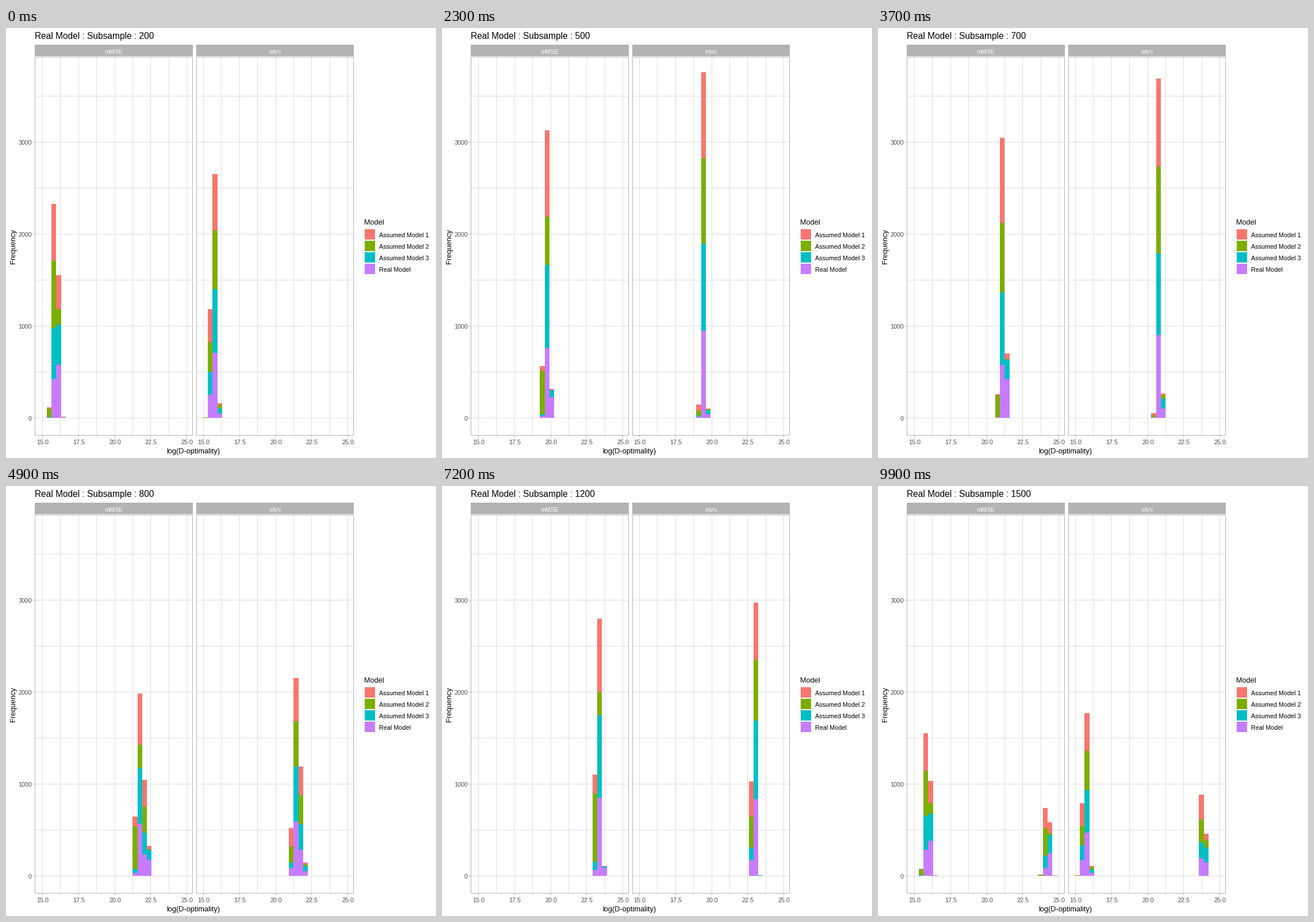
Recreate the animation shown at these times as a matplotlib script. Size 748 by 748 pixels, loop 10000 ms.

```python
import math

import numpy as np
import matplotlib.pyplot as plt
from matplotlib.animation import FuncAnimation
from matplotlib.patches import Rectangle

SIZE, DPI = 748, 68
BINS, BIN_W, BIN_X = 30, 8.3, 63.05
BASE, Y_SCALE = 678, 0.16
GREY, GRID, DIM = "#b3b3b3", "#dedede", "#4d4d4d"
MODELS = ["Assumed Model 1", "Assumed Model 2", "Assumed Model 3", "Real Model"]
COLORS = ["#f8766d", "#7cae00", "#00bfc4", "#c77cff"]
SIZES = range(200, 1501, 100)

PANELS = {"mMSE": 0, "mVc": 280.05}
# Quadratic path of the real model's centre, in bins, over log(size / 200).
TREND = {"mMSE": (-0.2256, 12.94, 3.073), "mVc": (-0.0444, 12.337, 2.284)}
# Per model: offset from that path and spread, each from small to large samples.
SHAPE = {
    "mMSE": [(-.206, -.324, .384, .26), (-.496, -.722, .447, .29),
             (-.127, -.156, .357, .285), (0, 0, .36, .345)],
    "mVc": [(-.149, -.172, .408, .25), (-.075, -.139, .446, .255),
            (.01, .024, .442, .25), (0, 0, .422, .255)],
}


def counts(panel, shape, size):
    """Expected counts per bin of 1000 normally distributed values."""
    x = math.log(size / 200)
    ramp = min(1, x / math.log(2.5))
    off0, off1, sd0, sd1 = shape
    mu = np.polyval(TREND[panel], x) + off0 + (off1 - off0) * ramp
    sd = sd0 + (sd1 - sd0) * ramp
    cdf = [0.5 * (1 + math.erf((k - mu) / sd / math.sqrt(2)))
           for k in range(BINS + 1)]
    return np.round(1000 * np.diff(cdf))


# Axes of each array: model, subsample size, bin.
DATA = {p: np.array([[counts(p, s, n) for n in SIZES] for s in SHAPE[p]])
        for p in PANELS}


def timeline():
    """(state, progress to next state, titled state) for every frame."""
    steps, n = [], len(SIZES)
    for i in range(n):
        steps += [(i, 0, i)] * 4
        length = 4 if i < 3 else 3
        for s in range(1, length + 1):
            near = i if s <= math.ceil(length / 2) else (i + 1) % n
            steps.append((i, s / length, near))
    return steps[:-1]


FRAMES = timeline()

plt.rcParams["font.family"] = "Liberation Sans"
fig = plt.figure(figsize=(SIZE / DPI, SIZE / DPI), dpi=DPI, facecolor="white")
ax = fig.add_axes([0, 0, 1, 1])
ax.set_xlim(0, SIZE)
ax.set_ylim(SIZE, 0)
ax.axis("off")


def box(x, y, w, h, color, z=1):
    return ax.add_patch(Rectangle((x, y), w, h, fc=color, lw=0, zorder=z,
                                  antialiased=False))


def text(x, y, s, px, color="black", ha="left", va="baseline", **kw):
    return ax.text(x, y, s, fontsize=px * 72 / DPI, color=color, ha=ha,
                   va=va, zorder=6, **kw)


def draw_panel(name, dx):
    left, right = math.floor(50.97 + dx), math.floor(324.6 + dx)
    width = right - left + 1
    for i in range(8):
        box(left, BASE - 80 * i, width, 1, GRID)
    for i in range(9):
        x = math.floor(63.5 + dx + 31.375 * i)
        box(x, 50, 1, 659, GRID)
        if i % 2 == 0:
            box(x, 709, 1, 3, GREY)
            text(x + 0.5, 724, f"{15 + 1.25 * i:.1f}", 10.7, DIM, "center")
    for x in (left, right):
        box(x, 50, 1, 659, GREY, 4)
    for y in (50, 708):
        box(left, y, width, 1, GREY, 4)
    box(left, 29, width, 20, GREY)
    text((left + right + 1) / 2, 45, name, 10.6, "white", "center")


def draw_legend():
    text(623, 342, "Model", 12.7)
    for i, (name, color) in enumerate(zip(MODELS, COLORS)):
        y = round(350 + 19.85 * i)
        box(624, y, 18, 18, color)
        text(649, y + 14, name, 10.75)


def draw_labels():
    for i in range(4):
        y = BASE - 160 * i
        box(47, y, 3, 1, GREY)
        text(45, y + 5, str(1000 * i), 10.7, DIM, "right")
    text(326, 740, "log(D-optimality)", 12.7, ha="center")
    text(13.5, 379.5, "Frequency", 12.7, ha="center", va="center", rotation=90)


def make_bars(dx):
    edges = np.floor(BIN_X + dx + BIN_W * np.arange(BINS + 1))
    return [[box(a, BASE, b - a, 0, c, 3) for a, b in zip(edges, edges[1:])]
            for c in COLORS]


for name, dx in PANELS.items():
    draw_panel(name, dx)
draw_labels()
draw_legend()
title = text(50, 19, "", 15.5)
BARS = {p: make_bars(dx) for p, dx in PANELS.items()}


def update(frame):
    i, t, near = FRAMES[frame]
    j = (i + 1) % len(SIZES)
    title.set_text(f"Real Model : Subsample : {SIZES[near]}")
    for p, rows in BARS.items():
        heights = (1 - t) * DATA[p][:, i] + t * DATA[p][:, j]
        # The last model lies at the bottom of the stack.
        tops = np.cumsum(heights[::-1], axis=0)[::-1]
        ys = np.round(BASE - Y_SCALE * np.vstack([tops, np.zeros(BINS)]))
        for row, top, bottom in zip(rows, ys, ys[1:]):
            for bar, a, b in zip(row, top, bottom):
                bar.set_y(a)
                bar.set_height(b - a)
                bar.set_visible(b > a)
    return []


anim = FuncAnimation(fig, update, frames=len(FRAMES), interval=100,
                     init_func=lambda: update(0), repeat=True, repeat_delay=0)
plt.show()
```
